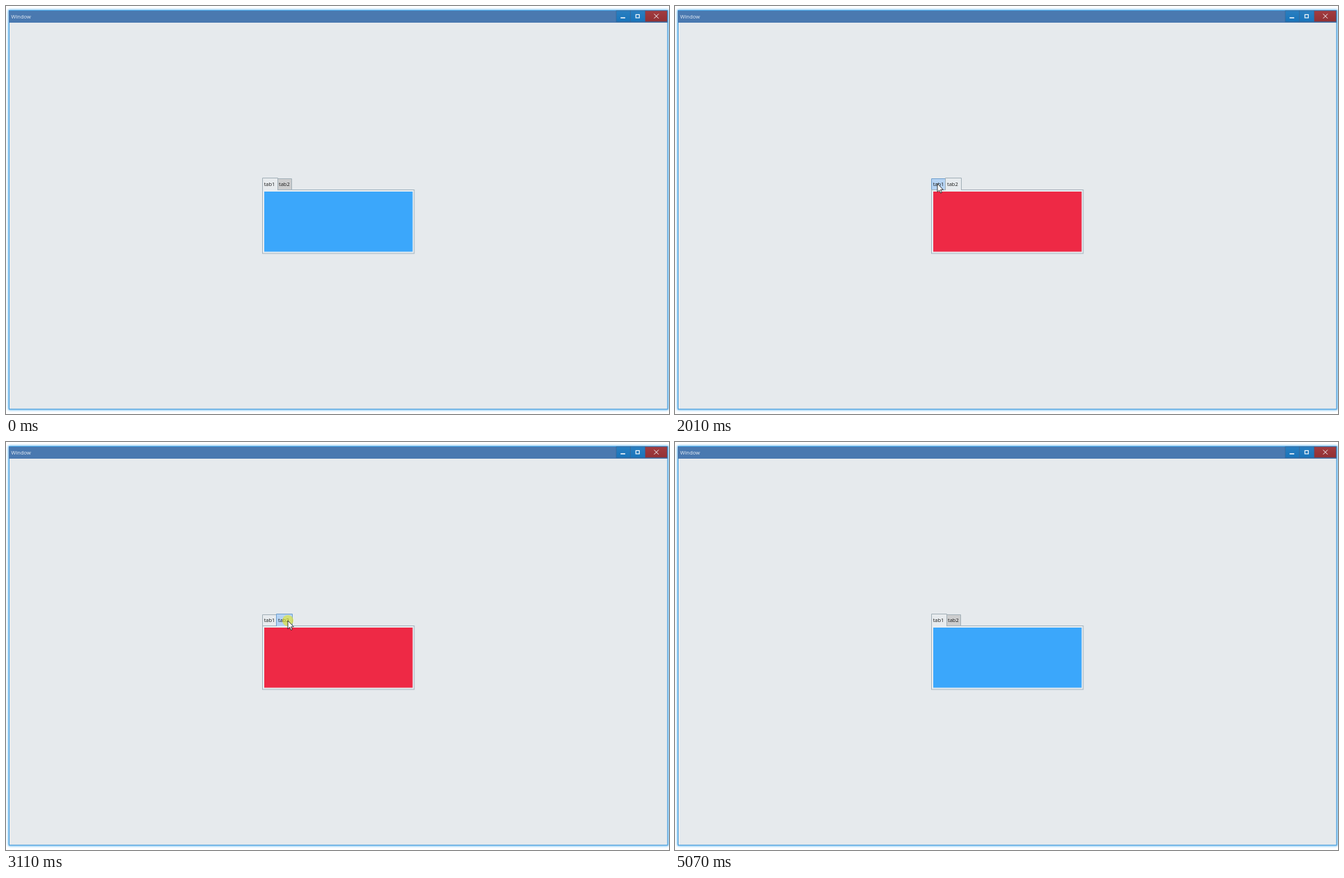
Write an HTML page that moves like this. It is 955 px wide and 587 px high and loops after 5450 ms.

```html
<!DOCTYPE html>
<html lang="en">
<head>
<meta charset="utf-8">
<title>Tabs</title>
<style>
  html, body { margin: 0; width: 100%; height: 100%; overflow: hidden; background: #fff; }
  svg { display: block; width: 100vw; height: 100vh; }
  text { font: 7.5px "Open Sans", "Noto Sans", sans-serif; fill: #1c1c1c; }
  .line { fill: none; stroke: #f4f8fb; }
</style>
</head>
<body>
<svg viewBox="0 0 955 587">
  <defs>
    <filter id="glow" x="-2%" y="-2%" width="104%" height="104%">
      <feGaussianBlur stdDeviation="1.4"/>
    </filter>
    <linearGradient id="blueButton" x2="0" y2="1">
      <stop stop-color="#2a7fc0"/><stop offset="1" stop-color="#1874bb"/>
    </linearGradient>
    <linearGradient id="redButton" x2="0" y2="1">
      <stop stop-color="#a23c40"/><stop offset="1" stop-color="#923033"/>
    </linearGradient>
  </defs>

  <rect x="3" y="5" width="951.5" height="576.5" rx="2" fill="#6dbcf2" filter="url(#glow)"/>
  <rect x="4.5" y="6.5" width="948.5" height="573.5" fill="#e6eaed" stroke="#3f97d9"/>
  <rect x="4" y="7" width="949" height="17" fill="#4a79b0"/>
  <text x="7.5" y="18.2" style="fill:#e8eef5">Window</text>

  <g stroke="#3a6796" stroke-width=".7">
    <rect x="879" y="6.8" width="20.3" height="16" fill="url(#blueButton)"/>
    <rect x="899.3" y="6.8" width="21.4" height="16" fill="url(#blueButton)"/>
    <rect x="920.7" y="6.8" width="31.6" height="16" fill="url(#redButton)"/>
  </g>
  <path class="line" d="M885.3 17h6.6" stroke-width="1.6"/>
  <rect class="line" x="907.3" y="12.4" width="5" height="4.6" stroke-width="1.2"/>
  <path class="line" d="M933.6 11.4l6.4 6.4m0-6.4l-6.4 6.4" stroke-width="1"/>

  <rect x="369.5" y="264.5" width="218.5" height="91.5" fill="#e9eef1" stroke="#a3b3be"/>
  <rect id="page" x="372" y="267" width="213.7" height="86.5"/>

  <g id="tabs"></g>
  <circle id="press" r="8" fill="#e8e820"/>
  <path id="cursor" d="M0 0V12L2.7 9.5 4.6 13.6 6.4 12.8 4.6 8.8H8.3Z"
        fill="#fff" stroke="#111" stroke-width=".8" stroke-linejoin="round"/>
</svg>

<script>
const LOOP = 5450;
const LIGHT = [231, 235, 238], GRAY = [204, 205, 206], BLUE = [181, 211, 243], MID = [190, 205, 219];
const CLICKS = [1240, 2090, 3030, 3820];
const $ = id => document.getElementById(id);

// Pointer moves: first step, last step, step count, target.
const START = [1061, 539.5];
const MOVES = [
  [310, 470, 3, 482, 277],
  [790, 1090, 5, 401.5, 258.5],
  [1710, 1940, 4, 378, 255.5],
  [2340, 2640, 5, 414.8, 258.5],
  [2715, 2870, 3, 406, 257],
  [3190, 3430, 4, 387, 254],
  [3510, 3680, 3, 385, 254],
  [4140, 4140, 1, 412, 244.5],
  [4215, 4290, 2, 814, 373],
  [4370, 4370, 1, 880, 428],
  [4680, 4992, 5, 932.5, 575]
];

const FILLS = [
  [[0, LIGHT], [1340, LIGHT], [1460, GRAY], [1790, GRAY], [1860, BLUE], [2150, BLUE], [2240, LIGHT],
   [3200, LIGHT], [3330, GRAY], [3430, GRAY], [3680, BLUE], [3860, BLUE], [3980, LIGHT]],
  [[0, GRAY], [1010, GRAY], [1160, BLUE], [1380, BLUE], [1460, LIGHT], [2130, LIGHT], [2240, GRAY],
   [2410, GRAY], [2490, BLUE], [2560, BLUE], [2640, MID], [2715, MID], [2870, BLUE],
   [3210, BLUE], [3330, LIGHT], [3820, LIGHT], [3950, GRAY]]
];

const TABS = ["tab1", "tab2"].map(label => {
  const make = (name, parent) =>
    parent.appendChild(document.createElementNS("http://www.w3.org/2000/svg", name));
  const g = make("g", $("tabs"));
  const box = make("path", g), text = make("text", g);
  text.textContent = label;
  text.setAttribute("y", 259);
  return { g, box, text };
});

function set(el, attrs) {
  for (const key in attrs) el.setAttribute(key, attrs[key]);
}

function colorAt(keys, t) {
  const i = keys.findLastIndex(k => k[0] <= t);
  const [t0, a] = keys[i], [t1, b] = keys[i + 1] || [LOOP, a];
  const p = (t - t0) / (t1 - t0);
  return a.map((v, c) => Math.round(v + (b[c] - v) * p));
}

function pointerAt(t) {
  let [x, y] = START;
  for (const [t0, t1, n, tx, ty] of MOVES) {
    if (t < t0) break;
    const gap = n > 1 ? (t1 - t0) / (n - 1) : 1;
    const p = Math.min(1, (Math.floor((t - t0) / gap + 1e-6) + 1) / n);
    x += (tx - x) * p;
    y += (ty - y) * p;
  }
  return [x, y];
}

function drawTab(i, selected, t) {
  const { g, box, text } = TABS[i];
  const fill = colorAt(FILLS[i], t);
  const left = i ? (selected ? 389.5 : 391.5) : 369.5;
  const right = i ? (selected ? 412.5 : 411.5) : (selected ? 391.5 : 389.5);
  const top = selected ? 247.5 : 248.5, bottom = selected ? 265 : 264;
  const hot = fill[2] - fill[0] > 40;
  set(box, {
    d: `M${left} ${bottom}V${top}H${right}V${bottom}`,
    fill: `rgb(${fill})`,
    stroke: hot ? "#6f9fcd" : "#a3b0b8"
  });
  text.setAttribute("x", i ? (selected ? 392 : 393) : 371.7);
  if (selected) $("tabs").append(g);
}

function render(t) {
  const active = CLICKS.filter(c => t >= c).length % 2;
  $("page").setAttribute("fill", active ? "#ee2945" : "#3ba7fb");
  if (active !== render.active) render.active = active;
  TABS.forEach((_, i) => drawTab(i, i === active, t));

  const [x, y] = pointerAt(t);
  const shown = t >= 310 && t < 5070;
  set($("cursor"), { transform: `translate(${x} ${y})`, visibility: shown ? "visible" : "hidden" });

  const age = t - (CLICKS.findLast(c => t >= c) ?? -LOOP);
  const fade = Math.max(0, Math.min(1, (180 - age) / 80));
  set($("press"), { cx: x, cy: y, opacity: 0.6 * fade });
}

const begin = performance.now();
function tick() {
  render((performance.now() - begin) % LOOP);
  requestAnimationFrame(tick);
}
tick();
</script>
</body>
</html>
```
